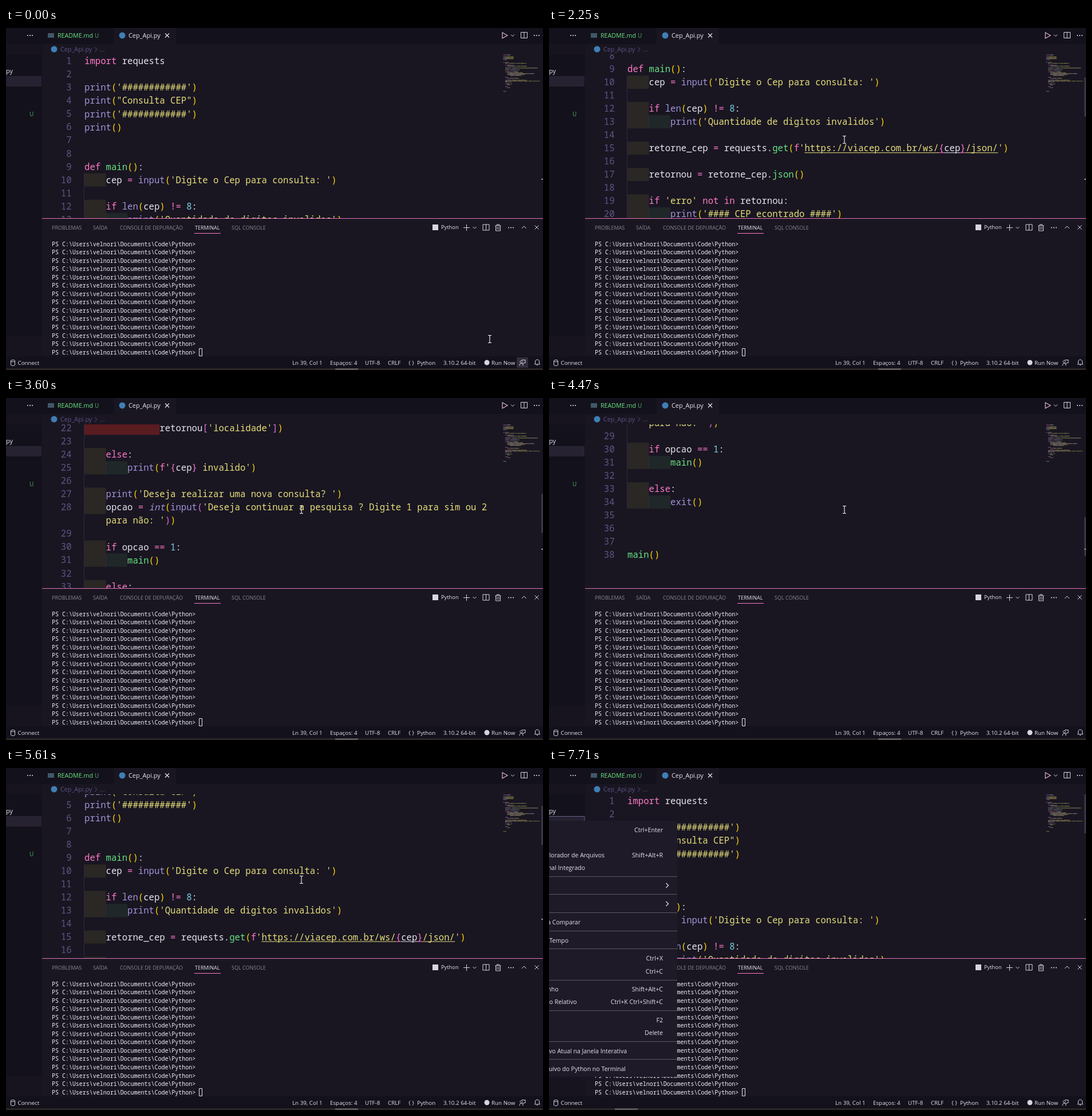
An HTML page with a canvas that plays this animation: 938x597 px, repeating every 8000 ms.

```html
<!DOCTYPE html>
<html lang="pt">
<head>
<meta charset="utf-8">
<style>
html, body { margin: 0; height: 100%; overflow: hidden; background: #191622; }
canvas { display: block; }
</style>
</head>
<body>
<canvas id="stage" width="938" height="597"></canvas>
<script>
const ctx = document.getElementById('stage').getContext('2d');
const LOOP = 8000, ROW = 23.03, COL = 9.375, NOTCH = 42.65, LEFT = 137;
const BG = '#191622', DARK = '#13111b', FG = '#e6e4ec', DIM = '#8a8594', PINK = '#ff79c6',
  YELLOW = '#e7de79', PURPLE = '#a292d6', GREEN = '#67e480', CYAN = '#78d1e1', LOGO = '#3f7fb4';
const BRACKETS = ['#ffd700', '#da70d6', '#179fff'];
const MONO = '"Noto Sans Mono", monospace', UI = '"Open Sans", sans-serif';

// "¬" marks a soft wrap
const SOURCE = `import requests

print('############')
print("Consulta CEP")
print('############')
print()


def main():
    cep = input('Digite o Cep para consulta: ')

    if len(cep) != 8:
        print('Quantidade de digitos invalidos')

    retorne_cep = requests.get(f'https://viacep.com.br/ws/{cep}/json/')

    retornou = retorne_cep.json()

    if 'erro' not in retornou:
        print('#### CEP econtrado ####')
        print(retornou['cep'], retornou['logradouro'], retornou¬['complemento'], retornou['bairro'],
              retornou['localidade'])

    else:
        print(f'{cep} invalido')

    print('Deseja realizar uma nova consulta? ')
    opcao = int(input('Deseja continuar a pesquisa ? Digite 1 para sim ou 2 ¬para não: '))

    if opcao == 1:
        main()

    else:
        exit()



main()`;

const TOKEN = /(f(?=')|\b(?:import|def|if|else|not|in)\b|[=!]=|=)|('[^']*'|"[^"]*")|(\b(?:int|print|input|len|exit)\b)|(\w+(?=\())|(\b\d+\b)|([()[\]])|(\w+|.)/g;
const TOKEN_COLORS = [PINK, YELLOW, PURPLE, GREEN, CYAN, null, FG];

// Lay the code out as coloured cells on a grid of rows and columns
const cells = [], lines = [];
let row = 0, depth = 0;
SOURCE.split('\n').forEach((line, i) => {
  const indent = line.search(/\S|$/);
  const info = { number: i + 1, row, indent, body: line.length > 0 };
  let col = 0;
  for (const match of line.matchAll(TOKEN)) {
    const text = match[0], kind = match.slice(1).findIndex(g => g !== undefined);
    let color = TOKEN_COLORS[kind], inBraces = false;
    if (kind === 5) color = BRACKETS['(['.includes(text) ? depth++ : --depth];
    for (const ch of text) {
      if (ch === '¬') { row++; col = indent; continue; }
      let tint = color;
      if (kind === 1 && '{}'.includes(ch)) { inBraces = ch === '{'; tint = PINK; }
      else if (inBraces) tint = FG;
      if (ch !== ' ') {
        cells.push({ ch, row, col, color: tint, italic: text === 'int',
          link: text.includes('://') && ch !== "'" });
      }
      col++;
    }
  }
  row++;
  info.rows = row - info.row;
  lines.push(info);
});

const SCROLL = [[0, 0], [1580, 1], [1910, 2], [2180, 3], [2250, 4], [2450, 5], [2720, 6], [2790, 7],
  [3060, 8], [3330, 9], [3400, 10], [3600, 12], [3870, 13], [4340, 14], [4400, 15], [4470, 16],
  [4940, 15], [5020, 13], [5110, 12], [5200, 10], [5280, 9], [5420, 7], [5510, 4], [5590, 2], [5680, 0]];
const POINTER = [[0, 845, 543], [70, 820, 515], [130, 740, 430], [200, 640, 320], [270, 545, 225],
  [330, 516, 195], [6280, 464, 180], [6350, 350, 160], [6420, 225, 140], [6490, 120, 120],
  [6560, 45, 105], [6630, -20, 95]];
const at = (steps, t) => steps.findLast(step => step[0] <= t).slice(1);

function box(x, y, w, h, color) { ctx.fillStyle = color; ctx.fillRect(x, y, w, h); }
function label(str, x, y, size = 9.8, color = FG, align = 'left', family = UI) {
  ctx.font = `${size}px ${family}`;
  ctx.textAlign = align;
  ctx.fillStyle = color;
  ctx.fillText(str, x, y + size * .36);
}
function stroke(d, x, y, color = '#d8d4e0', width = 1) {
  ctx.save();
  ctx.translate(x, y);
  ctx.strokeStyle = color;
  ctx.lineWidth = width;
  ctx.stroke(new Path2D(d));
  ctx.restore();
}
function dot(x, y, r, color) {
  ctx.fillStyle = color;
  ctx.beginPath();
  ctx.arc(x, y, r, 0, 7);
  ctx.fill();
}
const dots = (x, y) => [-4, 0, 4].forEach(d => dot(x + d, y, 1, FG));
const ICON = {
  down: 'M-3 -1.5L0 1.5L3 -1.5', up: 'M-4 2L0 -2L4 2', right: 'M-2 -4L2 0L-2 4',
  close: 'M-3.5 -3.5L3.5 3.5M3.5 -3.5L-3.5 3.5', split: 'M-5.5 -5.5h11v10h-11zM0 -5.5v10',
  play: 'M-4 -5L5 0L-4 5z', plus: 'M-5.5 0h11M0 -5.5v11',
  trash: 'M-5 -3.5h10M-2 -3.5v-2h4v2M-4 -3.5v9h8v-9M-1.5 -1.5v5M1.5 -1.5v5',
  database: 'M-3.5 -3.5c0 -2 7 -2 7 0v7c0 2 -7 2 -7 0zM-3.5 -3.5c0 2 7 2 7 0',
  bell: 'M-4.5 3h9l-1 -2v-3c0 -4 -7 -4 -7 0v3zM-1 4.5h2',
  feedback: 'M-2 0a2 2 0 1 0 -.1 0M-5 5c0 -6 6 -6 6 0M-1 -5h6v5h-2l-2 2v-2'
};

function drawCode(scroll) {
  ctx.save();
  ctx.beginPath();
  ctx.rect(63, 46, 875, 286);
  ctx.clip();
  const top = r => 46.4 + r * ROW - scroll;
  for (const { number, row, rows, indent, body } of lines) {
    const y = top(row), h = rows * ROW;
    if (y > 332 || y + h < 46) continue;
    if (body && indent === 14) box(LEFT, y, 14 * COL, ROW, '#591c21');
    else if (body) {
      if (indent >= 4) box(LEFT, y, 4 * COL, ROW, 'rgba(255,255,64,.075)');
      if (indent >= 8) box(LEFT + 4 * COL, y, 4 * COL, ROW, 'rgba(127,255,127,.075)');
    }
    if (number > 9 && number < 35) box(136, y, 1, h, '#30293f');
    if (indent >= 8 && indent < 14) box(174, y, 1, h, '#30293f');
    label(number, 114.5, y + 11.3, 15.6, '#5f5584', 'right', MONO);
  }
  ctx.textAlign = 'left';
  for (const c of cells) {
    const y = top(c.row), x = LEFT + c.col * COL;
    if (y > 332 || y < 20) continue;
    ctx.font = `${c.italic ? 'italic ' : ''}500 15.62px ${MONO}`;
    ctx.fillStyle = c.color;
    ctx.fillText(c.ch, x, y + 17);
    if (c.link) ctx.fillRect(x, y + 19, COL + .3, 1);
  }
  ctx.globalAlpha = .55;
  for (const c of cells) box(868.5 + c.col * .855, 46.5 + c.row * 1.63, .86, 1.1, c.color);
  ctx.restore();
}

function drawTop() {
  box(0, 0, 938, 28, DARK);
  box(188, 0, 109, 28, BG);
  box(63, 28, 875, 18, BG);
  dots(42, 13);
  box(73, 9, 11, 8, '#3f5868');
  label('README.md', 90, 13, 10.7, GREEN);
  label('U', 155, 13, 10, '#4fae63');
  dot(203, 13, 5.5, LOGO);
  label('Cep_Api.py', 214, 13, 10.9);
  stroke(ICON.close, 281.5, 13, FG, 1.2);
  dot(84, 37, 5.5, LOGO);
  label('Cep_Api.py', 95, 37, 10.8, '#5d5282');
  stroke(ICON.right, 157, 37.5, '#5d5282');
  label('...', 164, 37, 10.8, '#5d5282');
  stroke(ICON.play, 871, 13, '#e0b5d8', 1.2);
  stroke(ICON.down, 885, 13);
  stroke(ICON.split, 905, 13);
  dots(927, 13);
}

function drawExplorer() {
  box(0, 28, 63, 545, DARK);
  box(0, 28, 62, 18, '#17141f');
  box(0, 84, 62, 18, '#272231');
  box(0, 538, 63, 35, '#17141f');
  label('py', 0, 75, 10.8);
  label('U', 41, 150, 10, '#4fae63');
}

function drawPanel() {
  box(63, 332, 875, 241, BG);
  box(63, 332, 875, 1, '#e272b4');
  [['PROBLEMAS', 80], ['SAÍDA', 152], ['CONSOLE DE DEPURAÇÃO', 199], ['TERMINAL', 330], ['SQL CONSOLE', 394]]
    .forEach(([name, x]) => label(name, x, 348.5, 9, name === 'TERMINAL' ? FG : DIM));
  box(329, 358, 46, 1, PINK);
  box(745, 343, 10, 10, '#d8d4e0');
  label('Python', 760, 348, 9.3);
  stroke(ICON.plus, 804.5, 348.5);
  stroke(ICON.down, 818.5, 348.5);
  stroke(ICON.split, 838.5, 348.5);
  stroke(ICON.trash, 859.5, 348.5);
  dots(882, 348.5);
  stroke(ICON.up, 905, 348);
  stroke(ICON.close, 927, 348);
  for (let i = 0; i < 14; i++) {
    label('PS C:\\Users\\velnori\\Documents\\Code\\Python>', 80, 377 + i * 14.54, 9.97, '#f2f1f5', 'left', MONO);
  }
  stroke('M0 0h5v13h-5z', 337.5, 559.5, FG);
}

function drawStatus(hovered, taskX) {
  box(0, 573, 938, 21, DARK);
  box(0, 594, 938, 3, '#2b2626');
  box(taskX, 594, 40, 3, '#5c5759');
  stroke(ICON.database, 12, 584.5);
  [['Connect', 20.5], ['Ln 39, Col 1', 500], ['Espaços: 4', 566], ['UTF-8', 627], ['CRLF', 667],
    ['{ }', 703], ['Python', 718], ['3.10.2 64-bit', 764], ['Run Now', 848]]
    .forEach(([name, x]) => label(name, x, 584.5));
  dot(840, 584, 4.5, '#d8d4e0');
  if (hovered) box(892, 575, 20, 18, '#322d3b');
  stroke(ICON.feedback, 902, 584.5);
  stroke(ICON.bell, 928, 584);
}

const MENU = [
  [108, '', 0, 'Ctrl+Enter'], [152, 'Explorador de Arquivos', 97, 'Shift+Alt+R'],
  [174.5, 'Terminal Integrado', 63], [205, '', 0, '>'], [237, '', 0, '>'],
  [269, 'para Comparar', 55], [301, 'Linha do Tempo', 34], [332.5, '', 0, 'Ctrl+X'],
  [355, '', 0, 'Ctrl+C'], [386, 'Caminho', 16.5, 'Shift+Alt+C'],
  [408.5, 'Caminho Relativo', 48.5, 'Ctrl+K Ctrl+Shift+C'], [440, '', 0, 'F2'], [462.5, '', 0, 'Delete'],
  [494, 'Arquivo Atual na Janela Interativa', 136], [525, 'Arquivo do Python no Terminal', 134]];

function drawMenu() {
  box(0, 92, 224, 447, '#1e1a28');
  [189, 220, 252, 284, 315, 370, 423, 477, 508].forEach(y => box(0, y, 224, 1, '#5b5762'));
  for (const [y, name, right, keys] of MENU) {
    if (name) label(name, right, y, 10.5, FG, 'right');
    if (keys === '>') stroke(ICON.right, 206.5, y, FG, 1.2);
    else if (keys) label(keys, 199, y, 10.6, FG, 'right');
  }
}

function draw(t) {
  const scroll = at(SCROLL, t)[0] * NOTCH, [mouseX, mouseY] = at(POINTER, t);
  box(0, 0, 938, 597, BG);
  drawCode(scroll);
  if (t >= 270) box(935, 46 + scroll * .2373, 3, 68, '#3b3646');
  box(935, 263, 3, 2, '#8f8b98');
  drawTop();
  drawExplorer();
  drawPanel();
  drawStatus(t < 70, t < 7440 ? 575 : 115);
  if (t >= 7370) stroke('M0 0h62v18h-62', 0, 84.5, '#66638a');
  if (t >= 7440) drawMenu();
  stroke('M-3 -6.5h2l1 1l1 -1h2M0 -5.5v11M-3 6.5h2l1 -1l1 1h2', mouseX, mouseY, '#f4f4f6', 1.1);
}

(function frame() {
  draw(performance.now() % LOOP);
  requestAnimationFrame(frame);
})();
</script>
</body>
</html>
```
